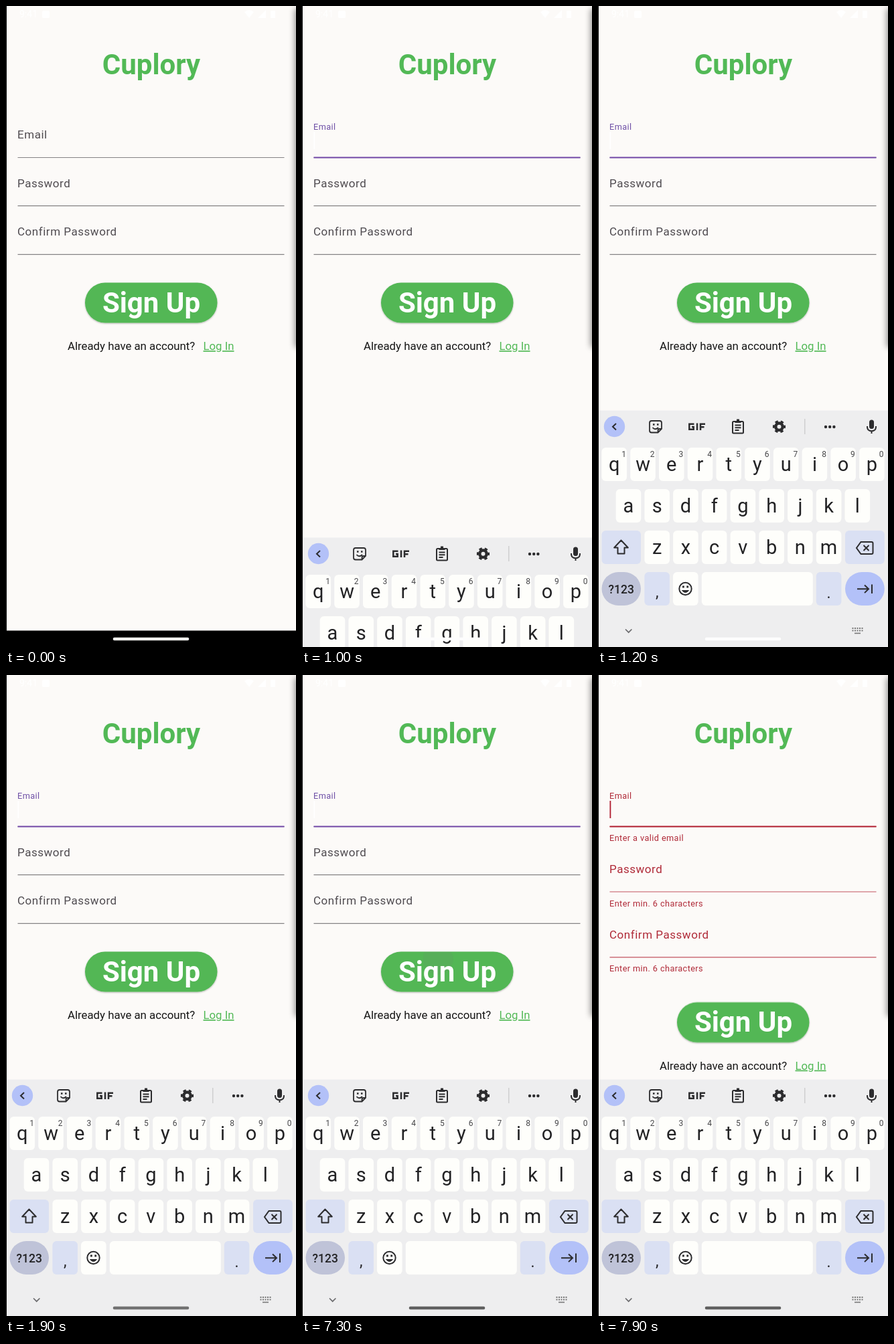
An HTML page that plays this animation: 433 by 958 pixels, repeating every 8000 ms.

```html
<!DOCTYPE html>
<html lang="en">
<head>
<meta charset="utf-8">
<title>Sign up form</title>
<style>
html, body { margin: 0; width: 100%; height: 100%; overflow: hidden; background: #fcfaf8; }
svg { display: block; width: 433px; height: 958px; font-family: Roboto, sans-serif; }

.anim, .shift, .label, .line, .error { animation: 8s step-end infinite; }
.shift { animation-name: shift; }
.title, .big { font-size: 42px; font-weight: 700; text-anchor: middle; }
.title, .link { fill: #52b956; }
.big { fill: #fff; }
.small { font-size: 16.8px; }
.link { text-decoration: underline; }
.label { font-size: 17px; letter-spacing: .53px; fill: #4f4b50; animation-name: label-red; }
.line { stroke: #858284; stroke-width: 1.2; animation-name: line-red; }
.error { font-size: 12.7px; letter-spacing: .42px; fill: #b02a38; opacity: 0; animation-name: show-error; }
#email { animation-name: float, email-color; }
#focus { stroke: #7046a6; stroke-width: 2; opacity: 0; animation-name: focus; }
#cursor { fill: #fff; opacity: 0; animation-name: cursor; }
#ripple { fill: #777; opacity: 0; animation-name: ripple; }
#keyboard { transform: translateY(360px); animation-name: slide; }
#pill { fill: #f1f1ef; animation-name: pill; }

.icon { fill: none; stroke: #2c2c2e; stroke-width: 2; }
.solid { fill: #2c2c2e; stroke: none; }
.key { font-size: 29px; fill: #222224; text-anchor: middle; }
.digit { font-size: 12px; fill: #454548; text-anchor: middle; }

@keyframes shift { 95%, 100% { transform: translateY(var(--dy)); } }
@keyframes label-red { 95% { fill: #8c3540; } 96.25%, 100% { fill: #b02a38; } }
@keyframes line-red { 95% { stroke: #b2626b; } 96.25%, 100% { stroke: #c2525f; } }
@keyframes show-error { 95% { opacity: .4; } 96.25%, 100% { opacity: 1; } }
@keyframes float {
  0% { transform: translate(17px, 198px); }
  11.25% { transform: translate(17px, 188.4px) scale(.81); }
  12.5%, 100% { transform: translate(17px, 185px) scale(.75); }
}
@keyframes email-color {
  11.25% { fill: #6a519b; }
  12.5% { fill: #6f50a6; }
  95% { fill: #90384f; }
  96.25%, 100% { fill: #b02a38; }
}
@keyframes focus {
  11.25% { opacity: .9; }
  12.5% { opacity: 1; stroke: #7046a6; }
  95% { opacity: 1; stroke: #93304f; }
  96.25%, 100% { opacity: 1; stroke: #b01c2e; }
}
@keyframes cursor {
  11.25% { opacity: 1; fill: #fff; }
  95%, 100% { opacity: 1; fill: #b01c2e; }
}
@keyframes ripple {
  91.25% { opacity: .12; transform: scale(.25); }
  92.5% { opacity: .12; transform: scale(.6); }
  93.75% { opacity: .1; transform: scale(1); }
  95% { opacity: .08; transform: scale(1.4); }
  96.25% { opacity: .04; transform: scale(1.6); }
  97.5%, 100% { opacity: 0; }
}
@keyframes slide {
  11.25% { transform: translateY(338.5px); }
  12.5% { transform: translateY(190px); }
  13.75% { transform: translateY(66.5px); }
  15%, 100% { transform: none; }
}
@keyframes pill {
  11.25% { fill: #fdfdfd; }
  18.75% { fill: #e4e4e4; }
  20% { fill: #c4c4c4; }
  21.25% { fill: #a4a4a4; }
  22.5% { fill: #868686; }
  23.75% { fill: #727272; }
  27.5% { fill: #6a6a6a; }
  31.25% { fill: #646464; }
  36.25%, 100% { fill: #606060; }
}
</style>
</head>
<body>
<svg viewBox="0 0 433 958">
  <defs>
    <filter id="soft" x="-200%" y="-10%" width="500%" height="120%"><feGaussianBlur stdDeviation="5"/></filter>
    <filter id="drop" x="-5%" y="-10%" width="110%" height="130%"><feDropShadow dx="0" dy="1" stdDeviation=".8" flood-opacity=".3"/></filter>
    <clipPath id="pillShape"><rect x="118" y="413.5" width="197.500" height="60" rx="30"/></clipPath>
  </defs>
  <rect width="433" height="958" fill="#fcfaf8"/>

  <!-- status bar -->
  <g fill="#fff">
    <text x="20" y="17" font-size="14">9:41</text>
    <rect x="54" y="7" width="11" height="11" rx="2"/>
    <path d="M356 9q7-6 14 0l-7 9zM376 18l12-12v12zM395 7h7v11h-7z"/>
  </g>
  <rect x="431" y="4" width="20" height="506" opacity=".42" filter="url(#soft)"/>

  <text class="title" x="217" y="101.500">Cuplory</text>

  <!-- fields -->
  <text class="label" id="email">Email</text>
  <path class="line" d="M17.500 226.500H415.500"/>
  <path class="anim" id="focus" d="M17.500 226.500H415.500"/>
  <rect class="anim" id="cursor" x="17.500" y="188" width="1.800" height="26"/>
  <text class="error" x="17" y="248">Enter a valid email</text>
  <g class="shift" style="--dy:25.300px">
    <text class="label" x="17" y="270.500">Password</text>
    <path class="line" d="M17.500 298.700H415.500"/>
    <text class="error" x="17" y="320.300">Enter min. 6 characters</text>
  </g>
  <g class="shift" style="--dy:50.500px">
    <text class="label" x="17" y="343">Confirm Password</text>
    <path class="line" d="M17.500 371.300H415.500"/>
    <text class="error" x="17" y="392.700">Enter min. 6 characters</text>
  </g>

  <g class="shift" style="--dy:75.600px">
    <rect x="118" y="413.500" width="197.500" height="60" rx="30" fill="#52b755" filter="url(#drop)"/>
    <g clip-path="url(#pillShape)"><g transform="translate(203 425)"><circle class="anim" id="ripple" r="90"/></g></g>
    <text class="big" x="217" y="457.500">Sign Up</text>
    <text class="small" x="92" y="514" fill="#161616">Already have an account?</text>
    <text class="small link" x="294.500" y="514">Log In</text>
  </g>

  <rect y="933.500" width="433" height="25"/>

  <g class="anim" id="keyboard">
    <rect x="1" y="604.500" width="432" height="360" fill="#eeeeef"/>
    <g id="keys"></g>

    <!-- toolbar -->
    <circle cx="24.500" cy="628.500" r="15.700" fill="#b3c1f8"/>
    <g class="icon">
      <path d="M27 624l-5 4.700 5 4.700"/>
      <path d="M80 620h12q3 0 3 3v9l-5.500 5.500H80q-3 0-3-3V623q0-3 3-3zM95 632h-3q-2.500 0-2.500 2.500v3M81.500 630q4 4.500 8.500 0" stroke-width="1.800"/>
      <path d="M82 625.500h2.500M88 625.500h2.500" stroke-width="2.400"/>
      <path d="M143.500 624.800H136.300V632.700H142.700V629H140M148 623.500V634M153 634V624.800H160M153 629.300H158.500" stroke-width="2.500"/>
      <path d="M202.500 621h13q1.500 0 1.500 1.500v14.500q0 1.500-1.500 1.500h-13q-1.500 0-1.500-1.500v-14.500q0-1.500 1.500-1.500zM204.500 626.500h9M204.500 630.300h9M204.500 634.100h6"/>
      <path d="M204.500 621.500h9M207 619h4" stroke-width="3"/>
      <circle cx="270.500" cy="628.700" r="5.200" stroke-width="4.400"/>
      <circle cx="270.500" cy="628.700" r="8" stroke-width="3.200" stroke-dasharray="4.400 3.978" stroke-dashoffset="2.200"/>
      <path d="M308.800 617v23" stroke="#c6c6c8" stroke-width="1.200"/>
      <path d="M402 628v1q0 6.200 6.500 6.200T415 629v-1M408.500 635v4"/>
    </g>
    <g class="solid">
      <circle cx="340" cy="629" r="2.200"/><circle cx="346.200" cy="629" r="2.200"/><circle cx="352.400" cy="629" r="2.200"/>
      <rect x="405" y="618.500" width="7" height="13.500" rx="3.500"/>
    </g>

    <!-- special keys -->
    <g class="icon">
      <path d="M34.500 798.500l-10.300 11h5.300v9h10v-9h5.300z" stroke-linejoin="round"/>
      <path d="M392.500 801h16q2 0 2 2v14q0 2-2 2h-16l-6.500-9zM396.500 806l8 8M404.500 806l-8 8"/>
      <circle cx="130.500" cy="871" r="9.200"/>
      <path d="M125.500 873.500q5 6 10 0z" fill="#2c2c2e" stroke-width="1"/>
      <path d="M126 868h2.800M132.300 868h2.800" stroke-width="2.800"/>
      <path d="M387 871.300h16M398 865.500l6 5.800-6 5.800M409 864.500v13.500"/>
      <path d="M41 931.500l4.700 4.700 4.700-4.700" stroke="#6d6d70" stroke-width="1.700"/>
      <path d="M379.500 930h16M379.500 933.500h16" stroke="#777" stroke-dasharray="2 1.500"/>
      <path d="M383 937.500h9" stroke="#777" stroke-width="1.600"/>
    </g>
  </g>

  <rect class="anim" id="pill" x="159.700" y="943.800" width="113.600" height="4.400" rx="2.200"/>
  <rect width="1" height="958"/>
</svg>
<script>
const PITCH = 42.73, KEY_W = 37.6, KEY_H = 50;
const WHITE = '#fefefb', PALE = '#dae0f3';
const keys = [];

const box = (x, y, w, fill, r = 6) =>
  keys.push(`<rect x="${x}" y="${y}" width="${w}" height="${KEY_H}" rx="${r}" fill="${fill}"/>`);
const glyph = (cls, x, y, s, extra = '') =>
  keys.push(`<text class="${cls}" x="${x}" y="${y}" ${extra}>${s}</text>`);

function row(letters, left, top, digits = '') {
  [...letters].forEach((ch, i) => {
    const x = left + i * PITCH;
    box(x, top, KEY_W, WHITE);
    glyph('key', x + KEY_W / 2, top + 34.5, ch);
    if (digits) glyph('digit', x + 33, top + 14, digits[i]);
  });
}

row('qwertyuiop', 5.5, 660, '1234567890');
row('asdfghjkl', 26.7, 722);
row('zxcvbnm', 69.4, 784);
box(5.5, 784, 58.5, PALE);
box(369, 784, 58.8, PALE);

box(5.5, 846, 58.5, '#bfc3d8', 25);
glyph('key', 34.7, 878, '?123', 'style="font-size:17.5px;font-weight:500"');
box(69.4, 846, KEY_W, PALE);
glyph('key', 88.2, 884, ',', 'style="font-size:23px"');
box(112, 846, KEY_W, WHITE);
box(154.8, 846, 166, WHITE);
box(325.8, 846, KEY_W, PALE);
glyph('key', 344.6, 885, '.', 'style="font-size:23px"');
box(369, 846, 58.8, '#b3c1f8', 25);

document.getElementById('keys').innerHTML = keys.join('');
</script>
</body>
</html>
```
